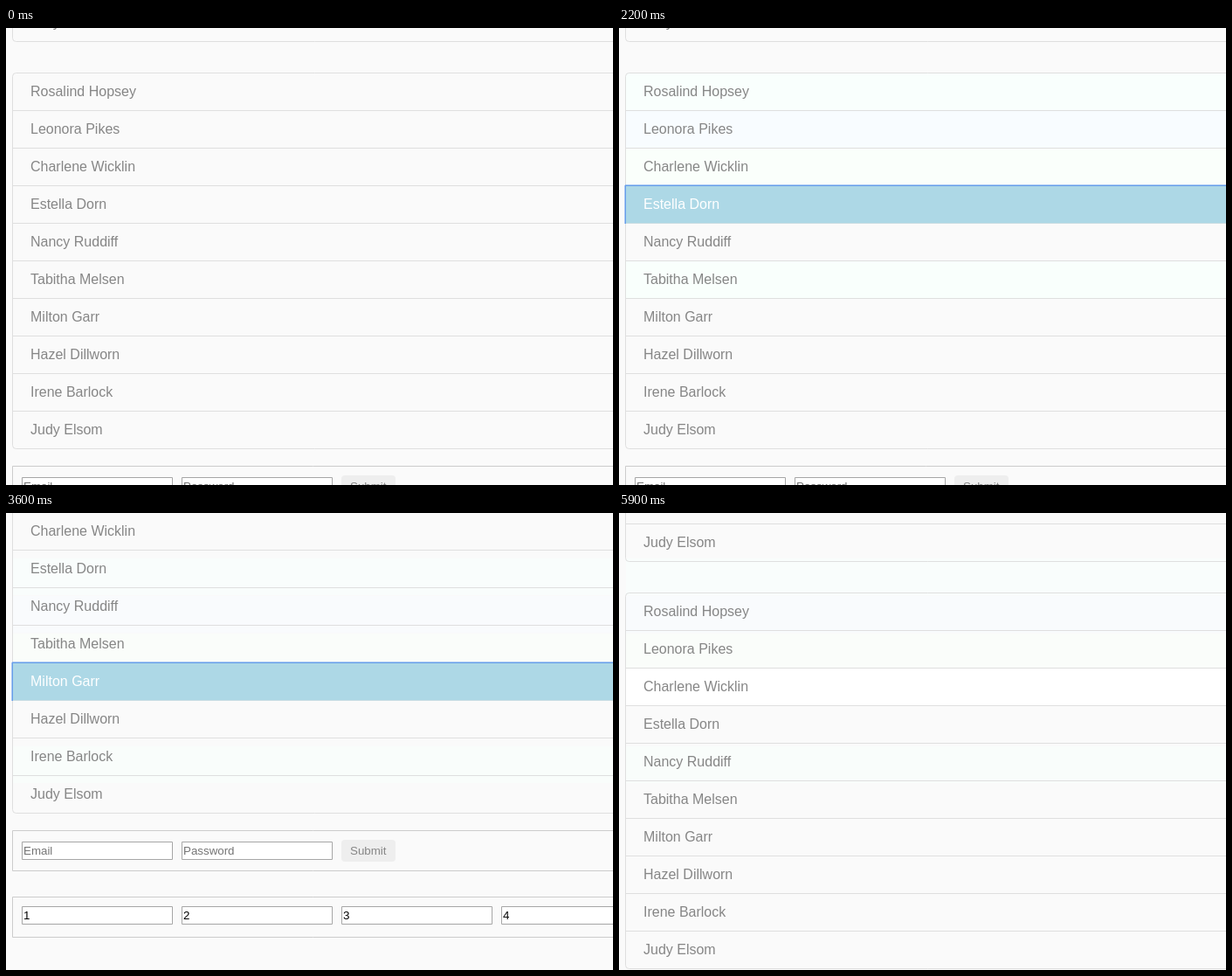
Animation, 695 px wide and 523 px high, one loop 6 s. Source, as an HTML page with a canvas:

```html
<!DOCTYPE html>
<html lang="en">
<head>
<meta charset="utf-8">
<title>List focus</title>
<style>
html, body { margin: 0; width: 100%; height: 100%; overflow: hidden; background: #fafafa; }
canvas { display: block; }
</style>
</head>
<body>
<canvas id="stage" width="695" height="523"></canvas>
<script>
const ctx = document.getElementById('stage').getContext('2d');
const W = 695, H = 523, LOOP = 6000;
const LEFT = 7, LIST_TOP = 51, ROW = 43, LIST_PITCH = 466, POINTER_Y = 209;
const SCROLL_START = 3000, SCROLL_STEP = 100, LEAVE = 5900;

const names = ['Rosalind Hopsey', 'Leonora Pikes', 'Charlene Wicklin', 'Estella Dorn',
  'Nancy Ruddiff', 'Tabitha Melsen', 'Milton Garr', 'Hazel Dillworn',
  'Irene Barlock', 'Judy Elsom'];

// [time, focused row] while the page is still
const visits = [[500, 0], [1000, 5], [1300, 3], [1600, 1], [1900, 2], [2200, 3]];
const tints = { 0: '#f9fffd', 1: '#f8fcff', 2: '#fafffb', 3: '#f9fffc', 5: '#f9fffc' };

// page offset at each scroll step
const offsets = [-18, -45, -72, -98, -120, -134, -138, -130, -114, -93, -70, -46, -20, 6, 28, 40];

function rect(x, y, w, h, color) {
  ctx.fillStyle = color;
  ctx.fillRect(x, y, w, h);
}

function frame(x, y, w, h, color, radius = 0) {
  ctx.strokeStyle = color;
  ctx.lineWidth = 1;
  ctx.beginPath();
  ctx.roundRect(x + 0.5, y + 0.5, w - 1, h - 1, radius);
  ctx.stroke();
}

function text(str, x, y, size, color) {
  ctx.font = `${size}px "Liberation Sans", Arial, sans-serif`;
  ctx.fillStyle = color;
  ctx.fillText(str, x, y);
}

function drawList(top) {
  frame(LEFT, top, W, ROW * names.length + 1, '#dfdfdf', 4);
  names.forEach((name, i) => {
    const y = top + i * ROW;
    if (i) rect(LEFT, y, W, 1, '#dfdfdf');
    text(name, 28, y + 27, 16, '#868686');
  });
}

function drawFocus(row, top) {
  const y = top + row * ROW;
  rect(LEFT + 1, y + 1, W, ROW - 1, '#add8e6');
  rect(LEFT, y + ROW, W, 1, '#c9dde3');
  rect(LEFT, y - 1, W, 1, 'rgba(94,152,238,.5)');
  rect(LEFT - 1, y, 1, ROW + 1, 'rgba(94,152,238,.5)');
  rect(LEFT, y, W, 1, '#659de8');
  rect(LEFT, y, 1, ROW + 1, '#659de8');
  text(names[row], 28, y + 27, 16, '#fff');
}

function drawInput(x, y, value, color) {
  rect(x, y, 173, 21, '#fff');
  frame(x, y, 173, 21, '#a6a6a6');
  text(value, x + 2, y + 15, 13.333, color);
}

function drawForms(offset) {
  const login = 501 + offset, numbers = 577 + offset;
  frame(LEFT, login, W, 47, '#ccc');
  drawInput(18, login + 13, 'Email', '#757575');
  drawInput(201, login + 13, 'Password', '#757575');
  ctx.fillStyle = '#eee';
  ctx.beginPath();
  ctx.roundRect(384, login + 11, 62, 25, 4);
  ctx.fill();
  text('Submit', 394, login + 28, 13.333, '#868686');

  frame(LEFT, numbers, W, 47, '#ccc');
  for (let i = 0; i < 4; i++) drawInput(18 + 183 * i, numbers + 11, String(i + 1), '#000');
}

// rows already left keep a faint tint in place
function drawTints(t) {
  const scrolling = t >= SCROLL_START;
  ctx.globalAlpha = scrolling ? 0.6 : 1;
  visits.forEach(([, row], i) => {
    const next = visits[i + 1];
    if (next && t >= next[0] && !(scrolling && row === 3)) {
      rect(LEFT + 1, LIST_TOP + row * ROW + 1, W, ROW - 1, tints[row]);
    }
  });
  ctx.globalAlpha = 1;
}

function draw(t) {
  const step = Math.floor((t - SCROLL_START) / SCROLL_STEP);
  const offset = step < 0 ? 0 : offsets[Math.min(step, offsets.length - 1)];
  const top = LIST_TOP + offset;
  const visit = visits.filter(([time]) => t >= time).pop();
  const row = step < 0 ? visit && visit[1] : Math.floor((POINTER_Y - top) / ROW);

  rect(0, 0, W, H, '#fafafa');
  drawTints(t);
  if (t >= LEAVE) rect(LEFT + 1, top + row * ROW + 1, W, ROW - 1, '#fff');
  drawList(top - LIST_PITCH);
  drawList(top);
  drawForms(offset);
  if (row !== undefined && t < LEAVE) drawFocus(row, top);
}

let start;
function tick(now) {
  start ??= now;
  draw((now - start) % LOOP);
  requestAnimationFrame(tick);
}
draw(0);
requestAnimationFrame(tick);
</script>
</body>
</html>
```
